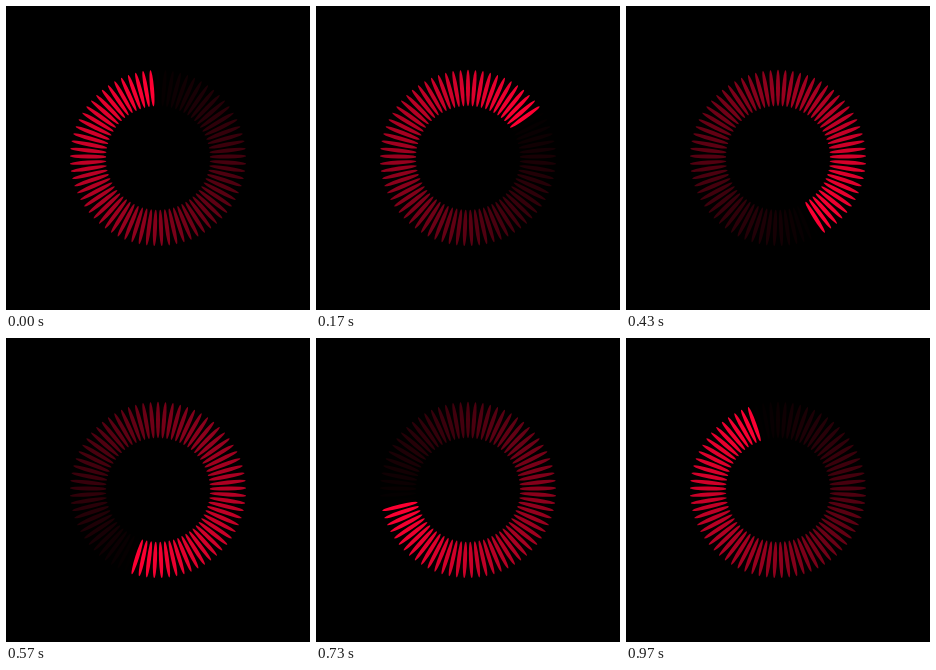
Write an HTML page with a canvas that moves like this. It is 304 px wide and 304 px high and loops after 1 s.

```html
<!DOCTYPE html>
<html lang="en">
<head>
<meta charset="utf-8">
<title>Spinner</title>
<style>
  html, body { margin: 0; width: 100%; height: 100%; overflow: hidden; background: #000; }
  canvas { display: block; }
</style>
</head>
<body>
<canvas width="304" height="304"></canvas>
<script>
const ctx = document.querySelector('canvas').getContext('2d');
const SPOKES = 73, STEPS = 30, CENTER = 152;

// Each spoke lights up in turn and then fades linearly over one loop.
function draw(phase) {
  ctx.globalAlpha = 1;
  ctx.fillStyle = '#000';
  ctx.fillRect(0, 0, 304, 304);
  ctx.fillStyle = '#ff0033';
  for (let i = 0; i < SPOKES; i++) {
    const age = (phase - (i + 1) / SPOKES + 2 + 1e-9) % 1;
    ctx.globalAlpha = 1 - age;
    ctx.save();
    ctx.translate(CENTER, CENTER);
    ctx.rotate(i / SPOKES * 2 * Math.PI);
    ctx.beginPath();
    ctx.ellipse(0, -70, 2, 18.2, 0, 0, 2 * Math.PI);
    ctx.fill();
    ctx.restore();
  }
}

// 30 steps per second, each starting on a whole hundredth of a second.
function tick() {
  const hundredths = Math.floor(performance.now() % 1000 / 10);
  draw(Math.floor((hundredths * 3 + 1) / 10) / STEPS);
  requestAnimationFrame(tick);
}
tick();
</script>
</body>
</html>
```
